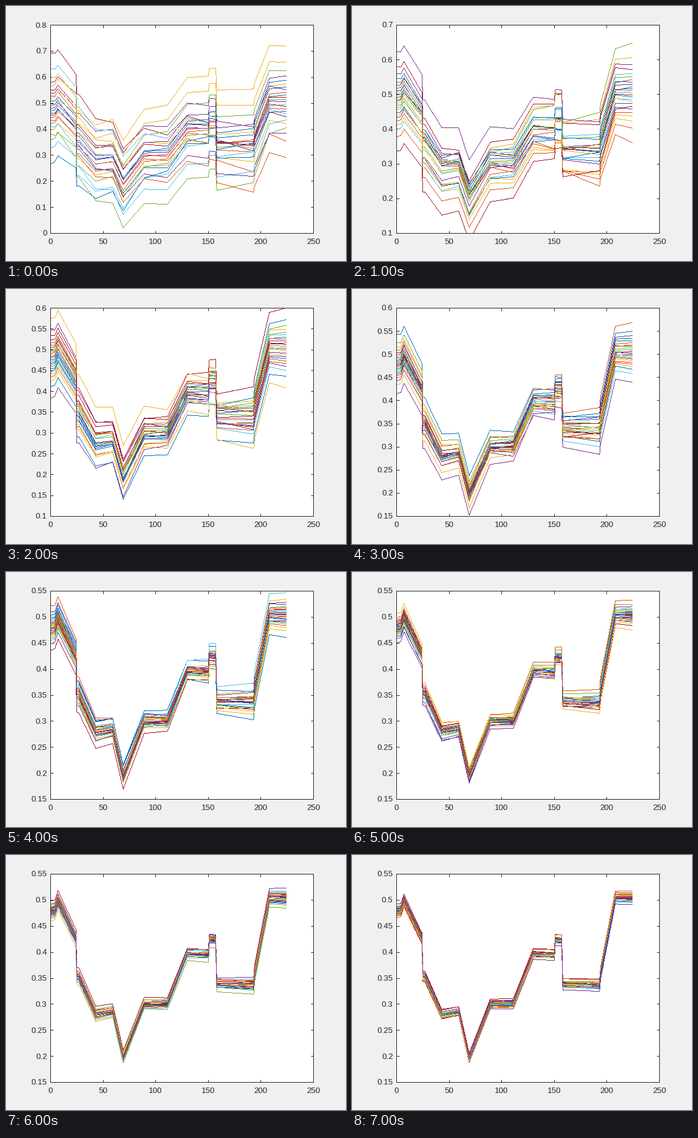
These frames come from a looping animation (560x420 px, 8000 ms). A matplotlib script:

```python
import numpy as np
import matplotlib.pyplot as plt
from matplotlib.animation import FuncAnimation
from matplotlib.ticker import FormatStrFormatter

W, H, DPI = 560, 420, 100
PX = 72 / DPI  # points per pixel
LEFT, TOP, RIGHT, BOTTOM = 73, 31, 506, 374
X_MAX = 250
STAGES, LINES = 8, 25
INK = "#262626"
PALETTE = ["#0072BD", "#D95319", "#EDB120", "#7E2F8E",
           "#77AC30", "#4DBEEE", "#A2142F"]

# Key points of the profile that every line converges to.
X = np.array([0, 4, 7, 24, 25, 27, 43, 59, 69, 89,
              111, 130, 150, 151, 157, 158, 193, 194, 208, 224])
PROFILE = np.array([.478, .480, .498, .425, .353, .351, .279, .285, .196, .299,
                    .300, .396, .394, .423, .422, .338, .336, .360, .504, .503])


def y_axis(stage):
    """Limits and tick step, tightening as the lines converge."""
    lo = (0, .1, .1, .15)[min(stage, 3)]
    hi = (.8, .7, .6, .6, .55)[min(stage, 4)]
    return lo, hi, .1 if hi - lo > .55 else .05


def stage_curves(stage):
    """Profile plus parabolas whose spread shrinks with each stage."""
    rng = np.random.default_rng(11 + stage)
    p = (np.arange(LINES) + .5) / LINES
    bell = .55 * np.log(p / (1 - p))  # evenly ranked, bell-shaped offsets
    left, right = rng.permutation(bell), rng.permutation(bell)
    rank = np.argsort(np.argsort(left + right + rng.normal(0, .6, LINES)))
    ends = .1 * .67 ** stage
    middle = (.085 * .5 ** stage + .004) * bell[rank]

    u = X / X[-1]
    bend = (np.outer(ends * left, (1 - u) * (1 - 2 * u))
            + np.outer(middle, 4 * u * (1 - u))
            + np.outer(ends * right, u * (2 * u - 1)))
    return PROFILE + bend


def pixel_path(y, x_scale, y_scale):
    """One point per pixel along the polyline, for a crisp unsmoothed line."""
    steps = np.maximum(np.diff(X) * x_scale, np.abs(np.diff(y)) * y_scale)
    at = np.concatenate([[0], np.cumsum(np.ceil(steps))])
    t = np.arange(at[-1] + 1)
    return np.interp(t, at, X), np.interp(t, at, y)


plt.rcParams["font.family"] = "Liberation Sans"
fig = plt.figure(figsize=(W / DPI, H / DPI), dpi=DPI, facecolor="#F0F0F0")
ax = fig.add_axes([LEFT / W, 1 - BOTTOM / H,
                   (RIGHT - LEFT) / W, (BOTTOM - TOP) / H])
ax.set_xlim(0, X_MAX)
ax.set_xticks(range(0, X_MAX + 1, 50))
ax.yaxis.set_major_formatter(FormatStrFormatter("%g"))
ax.tick_params(direction="in", top=True, right=True, length=4.5 * PX,
               width=.99 * PX, color=INK, labelcolor=INK,
               labelsize=13.33 * PX)
ax.tick_params(axis="x", pad=8.5 * PX)
ax.tick_params(axis="y", pad=5.5 * PX)
for spine in ax.spines.values():
    spine.set(linewidth=.99 * PX, color=INK)

lines = [ax.plot([], [], ",", color=PALETTE[i % len(PALETTE)])[0]
         for i in range(LINES)]


def draw(stage):
    lo, hi, step = y_axis(stage)
    ax.set_yticks(np.round(np.arange(lo, hi + step / 2, step), 2))
    ax.set_ylim(lo, hi)
    x_scale, y_scale = (RIGHT - LEFT) / X_MAX, (BOTTOM - TOP) / (hi - lo)
    for line, y in zip(lines, stage_curves(stage)):
        line.set_data(*pixel_path(y, x_scale, y_scale))
    return lines


anim = FuncAnimation(fig, draw, frames=STAGES, interval=1000, repeat=True)
plt.show()
```
